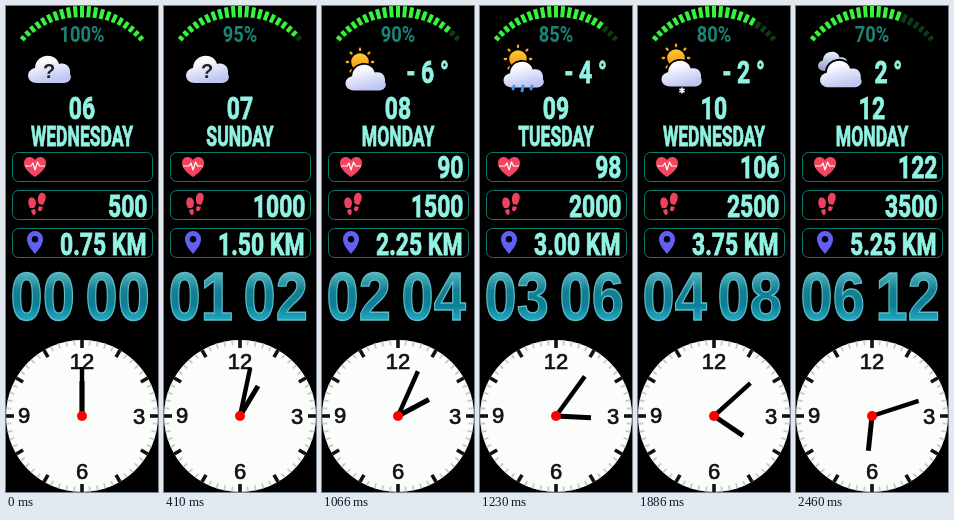
An HTML page that plays this animation: 152x486 px, repeating every 2.87 s.

```html
<!DOCTYPE html>
<html lang="en">
<head>
<meta charset="utf-8">
<title>Watch face</title>
<style>
  html, body { margin: 0; width: 100%; height: 100%; overflow: hidden; background: #000; }
  svg { display: block; width: 100vw; height: 100vh; }
  .label { font: 700 31px Roboto, sans-serif; fill: #91f3e3; stroke: #91f3e3; stroke-width: .9; white-space: pre; }
  .day { font-size: 27.4px; }
  .battery { font-size: 21.5px; fill: #1c8476; stroke: none; }
  .time { font: 700 68px "Liberation Sans", Arial, sans-serif; fill: url(#teal); stroke: #5fbcc8; stroke-width: 1.4; }
  .dial { font: 400 22px "Liberation Sans", Arial, sans-serif; text-anchor: middle; fill: #111; stroke: #111; stroke-width: .7; }
  .end { text-anchor: end; }
  .mid { text-anchor: middle; }
</style>
</head>
<body>
<svg viewBox="0 0 152 486">
  <defs>
    <linearGradient id="teal" x1="0" y1="0" x2="0" y2="1">
      <stop offset=".2" stop-color="#4fb2bd"/>
      <stop offset=".42" stop-color="#157f90"/>
      <stop offset=".62" stop-color="#0a8098"/>
      <stop offset=".82" stop-color="#26a9c2"/>
    </linearGradient>
    <linearGradient id="mist" x1="0" y1="0" x2=".4" y2="1">
      <stop offset=".3" stop-color="#fbfbff"/>
      <stop offset="1" stop-color="#bfc6f2"/>
    </linearGradient>
    <linearGradient id="dusk" x1="0" y1="0" x2="0" y2="1">
      <stop offset="0" stop-color="#eef1ff"/>
      <stop offset="1" stop-color="#8e9bc9"/>
    </linearGradient>
    <linearGradient id="gold" x1="0" y1="0" x2="0" y2="1">
      <stop offset="0" stop-color="#ffc933"/>
      <stop offset="1" stop-color="#f59415"/>
    </linearGradient>
    <path id="cloud" d="M9 27C-2 27-3 14 7 12C8-3 28-4 31 8C39 6 43 12 42 18C45 23 40 27 36 27Z"/>
    <g id="sun">
      <circle r="13" fill="url(#gold)"/>
      <g id="rays" stroke="#f8a41c" stroke-width="3.4" stroke-linecap="round"></g>
    </g>
  </defs>

  <g id="gauge" stroke-width="4"></g>
  <g id="weather"></g>
  <g id="labels"></g>

  <g fill="none" stroke="#087b70">
    <rect x="6.5" y="146.5" width="140" height="29" rx="6"/>
    <rect x="6.5" y="184.5" width="140" height="29" rx="6"/>
    <rect x="6.5" y="222.5" width="140" height="29" rx="6"/>
  </g>
  <path fill="#f4445f" d="M29 171C22 166 18 162 18 157C18 150 26 149 29 154C32 149 40 150 40 157C40 162 36 166 29 171Z"/>
  <path fill="none" stroke="#fff" stroke-width="1.2" stroke-linejoin="round" d="M19 160H25L27 157L29 164L31.5 156L33.5 160H39"/>
  <g fill="#ee405f">
    <path d="M23 193C25 190 30 192 30 197Q30 200 28 202L24 202Q21 197 23 193ZM25 204L29 203Q31 208 28 209Q26 209 25 204Z"/>
    <path d="M35 187C39 186 41 190 39 195L37 199L33 198C31 193 32 188 35 187ZM33 200L37 201Q36 206 33 205Q31 204 33 200Z"/>
  </g>
  <path fill="#625ff5" fill-rule="evenodd" d="M29 248C24 242 21 238 21 233A8 8 0 0 1 37 233C37 238 34 242 29 248ZM29 230A3.2 3.2 0 1 0 29 236.4A3.2 3.2 0 1 0 29 230Z"/>

  <circle cx="76" cy="410" r="76" fill="#fafdf9"/>
  <g id="dialTicks"></g>
  <g class="dial">
    <text x="76" y="362.5">12</text>
    <text x="133" y="418">3</text>
    <text x="76" y="473">6</text>
    <text x="18" y="417">9</text>
  </g>
  <g transform="translate(76 410)" stroke="#000">
    <path id="hourHand" d="M0 0V-35" stroke-width="5"/>
    <path id="minuteHand" d="M0 0V-49" stroke-width="4.4"/>
    <circle r="5" fill="#f00" stroke="none"/>
  </g>
</svg>

<script>
const STEP = 410, COUNT = 7;
const DAYS = ["WEDNESDAY", "SUNDAY", "MONDAY", "TUESDAY"];
const $ = id => document.getElementById(id);
const pad = n => String(n).padStart(2, "0");

function add(parent, tag, attrs) {
  const el = document.createElementNS("http://www.w3.org/2000/svg", tag);
  for (const key in attrs) el.setAttribute(key, attrs[key]);
  return parent.appendChild(el);
}

// Narrow lettering: one horizontal scale per text style.
function label(cls, x, y, narrow = .74) {
  return add($("labels"), "text", { class: cls, transform: `translate(${x} ${y}) scale(${narrow} 1)` });
}

const labels = {
  battery: label("label battery mid", 76, 36, .85),
  temp: label("label", 0, 77),
  date: label("label mid", 76, 113),
  day: label("label day mid", 76, 140, .64),
  pulse: label("label end", 141.5, 172),
  steps: label("label end", 141.5, 211),
  distance: label("label end", 140.5, 248.5),
  hours: label("time", 4.5, 314, .85),
  minutes: label("time", 79.5, 314, .85)
};

const gauge = Array.from({ length: 21 }, (_, i) => {
  const angle = (i - 10) * 4.9;
  const half = 6 - Math.abs(i - 10) * .33;
  return add($("gauge"), "path", {
    d: `M0 ${-78 - half}V${-78 + half}`, transform: `translate(76 83.5) rotate(${angle})`
  });
});

for (let i = 0; i < 8; i++)
  add($("rays"), "path", { d: "M0-17.5V-19.5", transform: `rotate(${i * 45})` });

for (let i = 0; i < 60; i++) {
  const hour = i % 5 === 0;
  add($("dialTicks"), "path", {
    d: `M0-76V${hour ? -68 : -71}`, "stroke-width": hour ? 3.6 : 1.8,
    stroke: hour ? "#111" : "#c8cac8", transform: `translate(76 410) rotate(${i * 6})`
  });
}

const cloud = (x, y, k = 1, fill = "mist") =>
  `<use href="#cloud" transform="translate(${x} ${y}) scale(${k})" fill="url(#${fill})" stroke="#000" stroke-width="4" paint-order="stroke"/>`;
const sun = (x, y, k = 1) => `<use href="#sun" transform="translate(${x} ${y}) scale(${k})"/>`;
const unknown = cloud(22, 50) +
  `<text x="43" y="72" text-anchor="middle" font-family="Liberation Sans, sans-serif" font-weight="700" font-size="20" fill="#222">?</text>`;
const partly = y => sun(38, y, .68) + cloud(23.5, y + 3, .94);
const rain = `<path d="M34 80l-1 3M43 80l-1 5M52 80l-1 3" stroke="#3f95ef" stroke-width="2.8" stroke-linecap="round"/>`;
const snow = `<path d="M44 81.5v6M41.4 83l5.2 3M46.6 83l-5.2 3" stroke="#f2f5ff" stroke-width="1.7"/>`;
const WEATHER = [
  unknown, unknown, partly(56), partly(53) + rain, partly(52) + snow,
  sun(43.5, 63.5), cloud(22, 46, .7, "dusk") + cloud(24, 55, .97)
];

function show(i) {
  const degrees = 2 * i - 10, below = degrees < 0;
  const text = {
    battery: `${100 - 5 * i}%`,
    temp: i < 2 ? "" : `${below ? "- " : ""}${Math.abs(degrees)} °`,
    date: pad(6 + i),
    day: DAYS[i % DAYS.length],
    pulse: i < 2 ? "" : 74 + 8 * i,
    steps: 500 * (i + 1),
    distance: `${(.75 * (i + 1)).toFixed(2)} KM`,
    hours: pad(i),
    minutes: pad(2 * i)
  };
  for (const key in text) labels[key].textContent = text[key];
  labels.temp.setAttribute("transform", `translate(${below ? 84.5 : 78.5} 77) scale(.74 1)`);
  gauge.forEach((tick, n) => tick.setAttribute("stroke", n <= 20 - i ? "#36f43c" : "#0c3d12"));
  $("weather").innerHTML = WEATHER[i];
  $("hourHand").setAttribute("transform", `rotate(${31 * i})`);
  $("minuteHand").setAttribute("transform", `rotate(${12 * i})`);
}

let shown = -1;
const start = performance.now();
function tick() {
  const i = Math.floor((performance.now() - start) / STEP) % COUNT;
  if (i !== shown) show(shown = i);
  requestAnimationFrame(tick);
}
tick();
</script>
</body>
</html>
```
